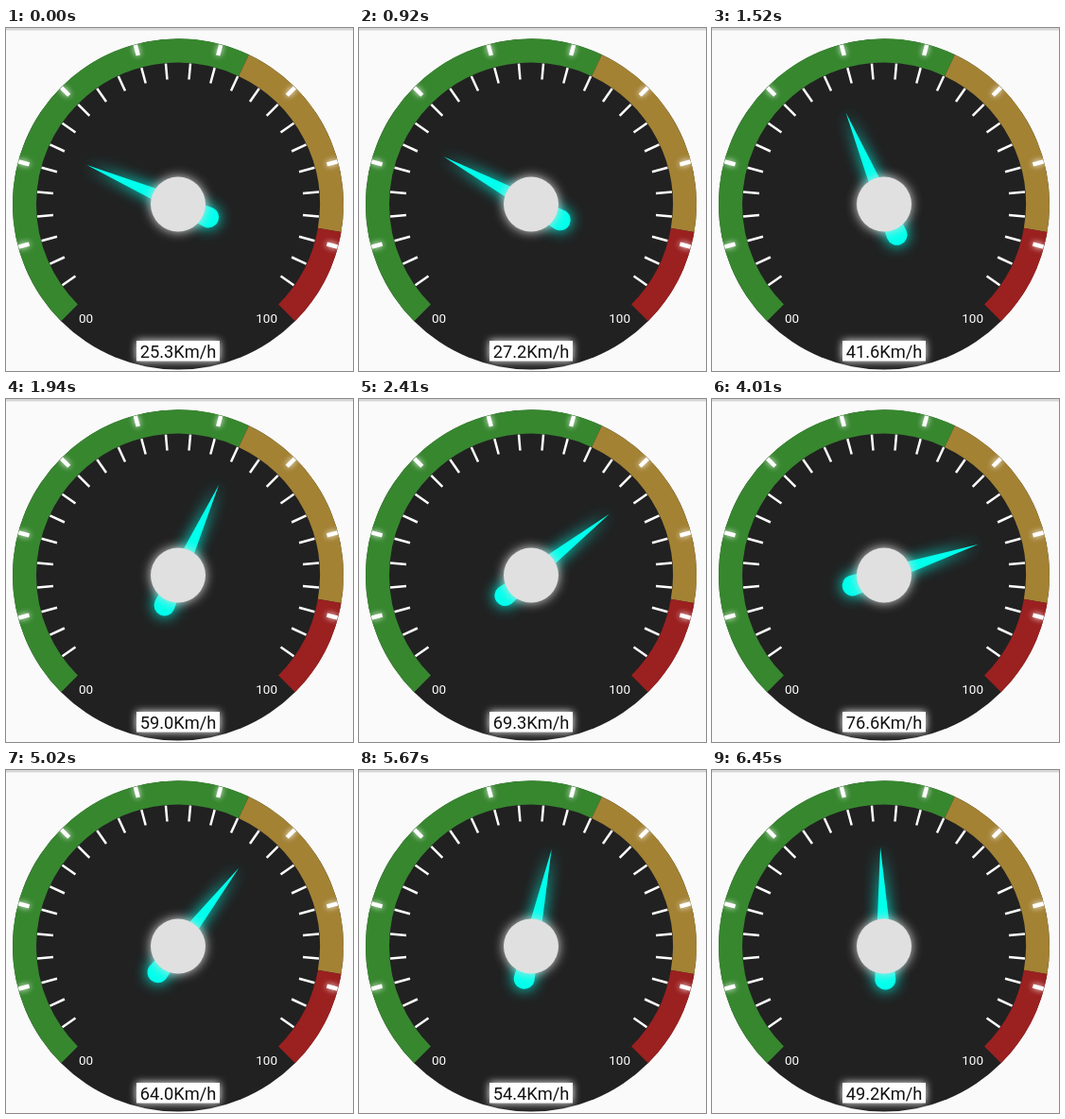
Recreate the animation shown at these times as an HTML page with a canvas. Size 367 px wide and 363 px high, loop 6.48 s.

```html
<!DOCTYPE html>
<html lang="en">
<head>
<meta charset="utf-8">
<title>Speedometer</title>
<style>
  html, body { margin: 0; width: 100%; height: 100%; overflow: hidden; background: #fafafa; }
  canvas { display: block; }
</style>
</head>
<body>
<canvas id="gauge" width="367" height="363"></canvas>
<script>
const ctx = document.getElementById('gauge').getContext('2d');
const LOOP = 6480, CX = 182, CY = 186.5, RADIUS = 175, RING = 25;
const rad = deg => deg * Math.PI / 180;

// [time in ms, speed]
const KEYS = [
  [0, 25.3], [80, 25.3], [680, 26.2], [1000, 27.8], [1340, 34.1], [1520, 41.6],
  [1940, 59], [2000, 60.7], [2700, 75.3], [3000, 77.9], [3360, 77.3], [4010, 76.6],
  [4190, 76.4], [4780, 69], [5020, 64], [5440, 56.9], [6090, 49.8], [6450, 49.2], [6480, 49.2]
];
// Moments at which the 60 ms refresh rhythm restarts
const BEATS = [0, 80, 2700, 4010, 4190, 4780, 6090];

function refreshTime(t) {
  const start = BEATS.filter(b => b <= t).pop();
  if (start === 0 || start === 4010) return start;
  return start + Math.floor((t - start) / 60) * 60;
}

function slope(i) {
  const a = KEYS[Math.max(i - 1, 0)], b = KEYS[i], c = KEYS[Math.min(i + 1, KEYS.length - 1)];
  const left = (b[1] - a[1]) / (b[0] - a[0] || 1);
  const right = (c[1] - b[1]) / (c[0] - b[0] || 1);
  return left * right > 0 ? 2 * left * right / (left + right) : 0;
}

// Monotone cubic through the keys
function speedAt(t) {
  let i = 0;
  while (i < KEYS.length - 2 && KEYS[i + 1][0] <= t) i++;
  const [t0, v0] = KEYS[i], [t1, v1] = KEYS[i + 1];
  const d = t1 - t0, u = (t - t0) / d, w = 1 - u;
  return v0 * (1 + 2 * u) * w * w + v1 * u * u * (3 - 2 * u)
    + d * (slope(i) * u * w * w - slope(i + 1) * u * u * w);
}

function glow(color, blur) {
  ctx.fillStyle = ctx.shadowColor = color;
  ctx.shadowBlur = blur;
}

// Draws with the origin at the hub; angles run clockwise from the top
function turned(deg, draw) {
  ctx.save();
  ctx.translate(CX, CY);
  ctx.rotate(rad(deg));
  draw();
  ctx.restore();
}

function disc(x, y, r) {
  ctx.beginPath();
  ctx.arc(x, y, r, 0, 2 * Math.PI);
  ctx.fill();
}

function band(from, to, color) {
  ctx.beginPath();
  ctx.arc(CX, CY, RADIUS - RING / 2, rad(from - 90), rad(to - 90));
  ctx.lineWidth = RING;
  ctx.strokeStyle = color;
  ctx.stroke();
}

function text(str, x, y, size, color, align) {
  ctx.font = size + 'px Roboto, sans-serif';
  ctx.fillStyle = color;
  ctx.textAlign = align;
  ctx.fillText(str, x, y);
}

function drawDial() {
  ctx.fillStyle = '#fafafa';
  ctx.fillRect(0, 0, 367, 363);
  ctx.fillStyle = '#d6d6d6';
  ctx.fillRect(0, 0, 367, 2);
  ctx.fillStyle = '#e8e8e8';
  ctx.fillRect(0, 2, 367, 1);

  ctx.fillStyle = '#212121';
  disc(CX, CY, RADIUS);
  band(-135, 25.3, '#37872f');
  band(25.3, 99.7, '#a38234');
  band(99.7, 135, '#9b2020');

  for (let a = -125; a <= 125; a += 10) turned(a, () => {
    ctx.fillStyle = '#fff';
    ctx.fillRect(-1.25, -149.5, 2.5, 17);
  });
  for (let a = -105; a <= 105; a += 30) turned(a, () => {
    glow('#fff', 6);
    ctx.fillRect(-2.2, -174.5, 4.4, 11.5);
  });
  text('00', 77, 312, 13.5, '#fff', 'left');
  text('100', 287, 312, 13.5, '#fff', 'right');
}

function drawNeedle(speed) {
  turned((speed - 50) * 2.7, () => {
    glow('#00ffec', 15);
    ctx.beginPath();
    ctx.moveTo(0, -105);
    ctx.lineTo(11, 35);
    ctx.arc(0, 35, 11, 0, Math.PI);
    ctx.fill();
  });
  turned(0, () => {
    glow('#e0e0e0', 12);
    disc(0, 0, 29);
  });
}

function drawReadout(speed) {
  ctx.save();
  glow('#fff', 8);
  ctx.fillRect(138, 331, 88, 21.5);
  ctx.restore();
  text(speed.toFixed(1) + 'Km/h', 182, 349, 18.3, '#111', 'center');
}

function frame() {
  const speed = speedAt(refreshTime(performance.now() % LOOP));
  drawDial();
  drawNeedle(speed);
  drawReadout(speed);
  requestAnimationFrame(frame);
}
frame();
</script>
</body>
</html>
```
